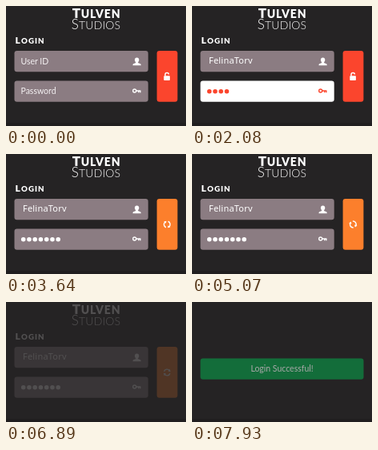
An HTML page for the animation above (8000 ms loop, 225 px wide and 150 px high).

```html
<!DOCTYPE html>
<html lang="en">
<head>
<meta charset="utf-8">
<title>Login</title>
<style>
  html, body { margin: 0; width: 100%; height: 100%; overflow: hidden; background: #252324; }
  svg { display: block; width: 100vw; height: 100vh; }
  text { font-family: Lato, "Open Sans", sans-serif; fill: #fff; }
  .bold { font-weight: 900; }
  .thin { font-weight: 300; }
  .label { font-size: 10.5px; fill: #f4f1f2; }
  #name { font-family: "Noto Sans", "Open Sans", sans-serif; font-size: 11px; letter-spacing: .2px; }
</style>
</head>
<body>
<svg viewBox="0 0 225 150">
  <rect width="225" height="150" fill="#252324"/>
  <rect y="146" width="225" height="4" fill="#201e1f"/>

  <g id="form">
    <text class="bold" x="113" y="15.4" font-size="14" text-anchor="middle" letter-spacing=".8"><tspan font-size="17">T</tspan>ULVEN</text>
    <text class="thin" x="112.5" y="29" font-size="14" text-anchor="middle" letter-spacing=".2"><tspan font-size="17">S</tspan>TUDIOS</text>
    <text class="bold" x="11.5" y="47" font-size="9.7" letter-spacing="1.1"><tspan font-size="12">L</tspan>OGIN</text>

    <rect id="userBox" x="10.5" y="56" width="167.2" height="26.2" rx="3.2"/>
    <text id="userLabel" class="label" x="18.5" y="72.7">User ID</text>
    <text id="name" x="21" y="72"></text>
    <path id="userIcon" transform="translate(-.4 .4)" d="M164 64c1.8 0 2.7 1.3 2.7 2.9 0 1.4-.6 2.5-1.4 3.1v.7l3 1.2c.6.3.8.8.8 1.9h-10.2c0-1.1.2-1.6.8-1.9l3-1.2v-.7c-.8-.6-1.4-1.7-1.4-3.1 0-1.6.9-2.9 2.7-2.9z"/>

    <rect id="passBox" x="10.5" y="93.5" width="167.2" height="26.2" rx="3.2"/>
    <text id="passLabel" class="label" x="18.5" y="110">Password</text>
    <g id="dots"></g>
    <g id="keyIcon" fill="none" stroke-width="1.4" transform="translate(-.6 0)">
      <circle cx="161.3" cy="106" r="2"/>
      <path d="M163.3 106h5.7M166.3 106v2.2M168.4 106v2.2"/>
    </g>

    <rect id="button" x="188.6" y="56" width="25.8" height="63.7" rx="3.2"/>
    <g id="lock">
      <rect x="197.3" y="87.3" width="7.6" height="5.7" rx=".8" fill="#fff"/>
      <path d="M199 87.5v-1.9a2.2 2.2 0 0 1 4.4 0" fill="none" stroke="#fff" stroke-width="1.5"/>
    </g>
    <g id="spinner">
      <g id="arrow">
        <path d="M-3.9 .6A3.9 3.9 0 0 1 1.6-3.5" fill="none" stroke="#fff" stroke-width="1.4"/>
        <path d="M1.2-5.3L3.5-2.7 .4-1.8z" fill="#fff"/>
      </g>
      <use href="#arrow" transform="rotate(180)"/>
    </g>
  </g>

  <g id="success">
    <rect x="10.5" y="70.5" width="204" height="26.2" rx="3.2" fill="#099d49"/>
    <text x="112.5" y="87" font-size="10.5" text-anchor="middle">Login Successful!</text>
  </g>
</svg>
<script>
  const LOOP = 8000, STEP = 130;
  const NAME = "FelinaTorv", PASS_LENGTH = 7;
  const USER_FOCUS = 130, PASS_FOCUS = 1560, SUBMIT = 2730;
  const WHITE = [255, 255, 255], RED = [251, 69, 45], ORANGE = [252, 127, 44], GREY = [139, 124, 130];

  const el = id => document.getElementById(id);
  const clamp = (v, lo = 0, hi = 1) => Math.min(hi, Math.max(lo, v));
  const ramp = (t, from, to) => clamp((t - from) / (to - from));
  const rgb = c => `rgb(${c.map(Math.round)})`;
  const mix = (a, b, k) => rgb(a.map((v, i) => v + (b[i] - v) * k));
  const typed = (t, focus, max) => clamp(Math.floor((t - focus) / STEP), 0, max);
  const show = (id, opacity) => el(id).setAttribute("opacity", opacity);

  const dots = Array.from({ length: PASS_LENGTH }, (_, i) => {
    const dot = document.createElementNS("http://www.w3.org/2000/svg", "circle");
    dot.setAttribute("cx", 21.7 + i * 7.25);
    dot.setAttribute("cy", 106.7);
    dot.setAttribute("r", 2.8);
    return el("dots").appendChild(dot);
  });

  function render(t) {
    const userActive = t >= USER_FOCUS && t < PASS_FOCUS;
    const passActive = t >= PASS_FOCUS && t < SUBMIT;
    const userInk = rgb(userActive ? RED : WHITE);
    const passInk = rgb(passActive ? RED : WHITE);

    el("userBox").setAttribute("fill", rgb(userActive ? WHITE : GREY));
    el("userIcon").setAttribute("fill", userInk);
    el("name").style.fill = userInk;
    el("name").textContent = NAME.slice(0, typed(t, USER_FOCUS, NAME.length));
    show("userLabel", t < USER_FOCUS ? 1 : 0);

    el("passBox").setAttribute("fill", rgb(passActive ? WHITE : GREY));
    el("keyIcon").setAttribute("stroke", passInk);
    el("dots").setAttribute("fill", passInk);
    const count = typed(t, PASS_FOCUS, PASS_LENGTH);
    dots.forEach((dot, i) => dot.setAttribute("opacity", i < count ? 1 : 0));
    show("passLabel", t < PASS_FOCUS ? 1 : 0);

    const loading = ramp(t, SUBMIT, SUBMIT + 4 * STEP);
    el("button").setAttribute("fill", mix(RED, ORANGE, loading));
    show("lock", 1 - loading);
    show("spinner", loading);
    el("spinner").setAttribute("transform", `translate(201.3 88) rotate(${150 + (t - SUBMIT) * 0.36})`);

    show("form", 1 - ramp(t, 6050, 7100));
    show("success", ramp(t, 7200, 8400));
  }

  function tick() {
    const t = performance.now() % LOOP;
    render(Math.floor(t / STEP) * STEP);
    requestAnimationFrame(tick);
  }
  tick();
</script>
</body>
</html>
```
